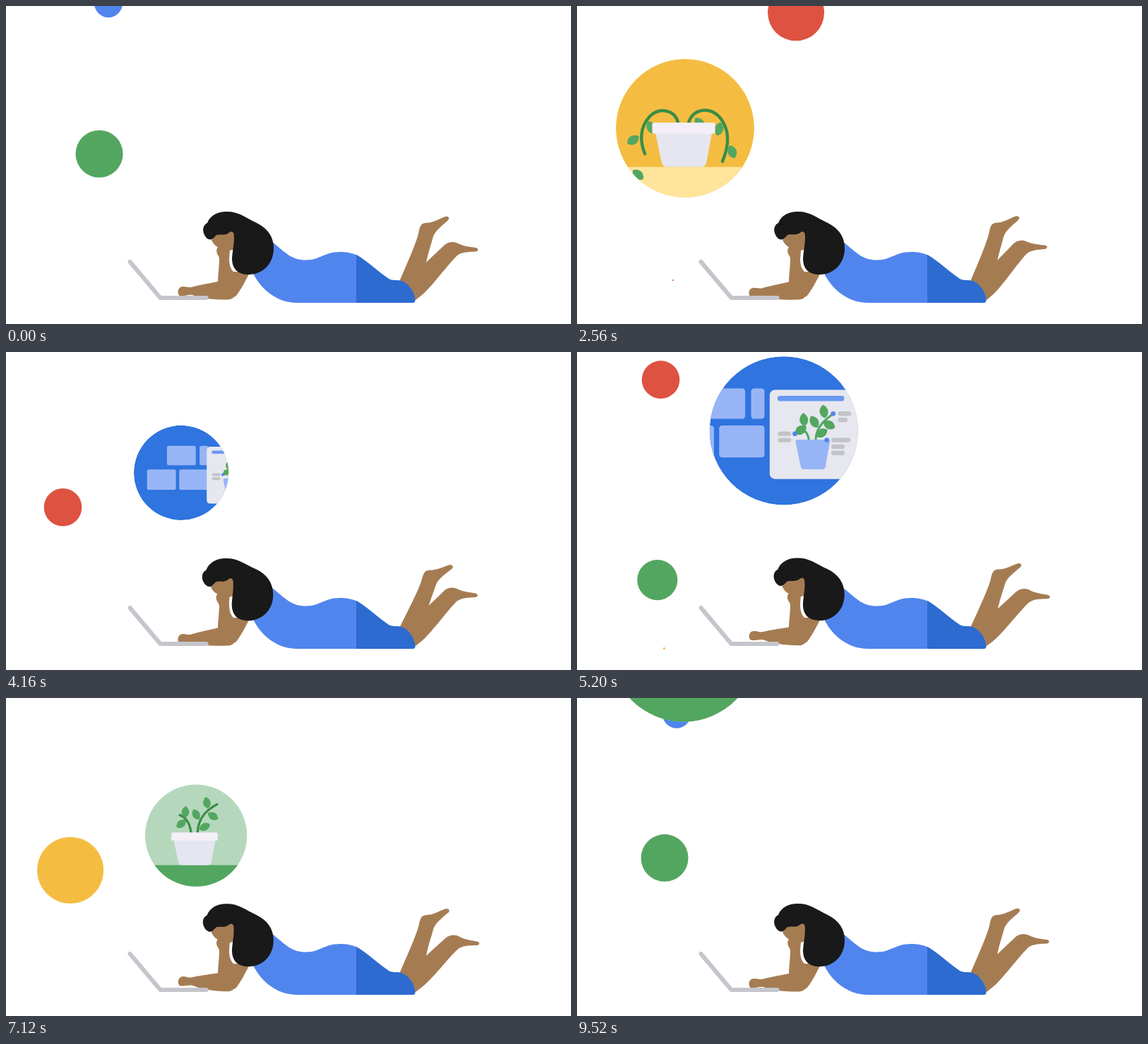
Write an HTML page without scripts that moves like this. It is 800 by 450 pixels and loops after 9.6 s.

```html
<!DOCTYPE html>
<html lang="en">
<head>
<meta charset="utf-8">
<title>Daydreaming at the laptop</title>
<style>
html, body { margin: 0; width: 100%; height: 100%; overflow: hidden; background: #fff; }
svg { display: block; width: 100vw; height: 100vh; }

.move { animation: 9600ms linear infinite; }
.body { animation: 9600ms ease-in-out infinite; }

.red { fill: #de5241; }
.blue { fill: #5185ee; }
.green { fill: #53a660; }
.yellow { fill: #f4bd42; }
.skin { fill: #a57c52; }
.leaf { fill: #53a660; }
.stem { fill: none; stroke: #3a8d46; stroke-width: 4.5; stroke-linecap: round; }
.grey { fill: #c3c4c8; }
.tile { fill: #97b5f6; }

/* plain bubbles, radius 100 scaled down */
#redBig { animation-name: redBig; }
@keyframes redBig {
  0%, 2% { translate: 150px 380px; scale: 0; }
  8% { translate: 172px 300px; scale: .24; }
  15% { translate: 215px 212px; scale: .4; }
  21% { translate: 264px 106px; scale: .4; }
  26.67% { translate: 310px 9.5px; scale: .4; }
  30%, 100% { translate: 333px -55px; scale: .4; }
}
#blueFirst { animation-name: blueFirst; }
@keyframes blueFirst {
  0%, 14.2% { translate: 118px 360px; scale: 0; }
  15% { translate: 115px 355px; scale: .04; }
  20% { translate: 108px 300px; scale: .14; }
  26.67% { translate: 125px 225px; scale: .2; }
  31.5% { translate: 150px 130px; scale: .2; }
  37.5%, 100% { translate: 150px -30px; scale: .2; }
}
#redSmall { animation-name: redSmall; }
@keyframes redSmall {
  0%, 26.2% { translate: 137px 390px; scale: 0; }
  26.67% { translate: 136px 388px; scale: .01; }
  32% { translate: 108px 336px; scale: .11; }
  38% { translate: 87px 277px; scale: .22; }
  43.33% { translate: 80.5px 220px; scale: .268; }
  48% { translate: 92px 150px; scale: .268; }
  53% { translate: 115px 62px; scale: .268; }
  58%, 100% { translate: 130px -35px; scale: .268; }
}
#greenBig { animation-name: greenBig; }
@keyframes greenBig {
  0%, 48% { translate: 136px 388px; scale: 0; }
  54% { translate: 114px 325px; scale: .28; }
  59.4% { translate: 108px 252px; scale: .45; }
  63.33% { translate: 125px 188px; scale: .47; }
  67.7% { translate: 150px 90px; scale: .47; }
  72.5%, 100% { translate: 165px -52px; scale: .47; }
}
#yellowBall { animation-name: yellowBall; }
@keyframes yellowBall {
  0%, 53.6% { translate: 125px 420px; scale: 0; }
  59% { translate: 110px 416px; scale: .14; }
  63.33% { translate: 99px 409.5px; scale: .217; }
  65.8% { translate: 85px 396px; scale: .29; }
  69.5% { translate: 61px 340px; scale: .43; }
  72% { translate: 72px 282px; scale: .47; }
  76.67% { translate: 113px 200px; scale: .47; }
  81.7% { translate: 153px 110px; scale: .47; }
  86.67% { translate: 192px 25px; scale: .47; }
  91%, 100% { translate: 225px -55px; scale: .47; }
}
#blueLast { animation-name: blueLast; }
@keyframes blueLast {
  0% { translate: 145px -3.5px; scale: .2; }
  1% { translate: 149px -32px; scale: .2; }
  1.1%, 75.5% { translate: 140px 388px; scale: 0; }
  81% { translate: 150px 334px; scale: .12; }
  86.67% { translate: 159px 268px; scale: .202; }
  92% { translate: 140px 170px; scale: .202; }
  96% { translate: 131px 93px; scale: .202; }
  99.17% { translate: 141px 23px; scale: .2; }
  100% { translate: 145px -3.5px; scale: .2; }
}
#greenLast { animation-name: greenLast; }
@keyframes greenLast {
  0% { translate: 132px 209.5px; scale: .335; }
  5% { translate: 164px 104px; scale: .335; }
  11% { translate: 178px -38px; scale: .335; }
  11.1%, 85.5% { translate: 124px 372px; scale: 0; }
  86.67% { translate: 115px 356px; scale: .05; }
  91.5% { translate: 101px 306px; scale: .2; }
  96% { translate: 105px 262px; scale: .31; }
  99.17% { translate: 124px 226.5px; scale: .335; }
  100% { translate: 132px 209.5px; scale: .335; }
}

/* thought bubbles */
#wilting { animation-name: wilting; }
@keyframes wilting {
  0%, 1.5% { translate: 215px 318px; scale: 0; }
  8.3% { translate: 178px 245px; scale: .42; }
  15% { translate: 155px 194px; scale: .75; }
  21.67% { translate: 153px 180px; scale: .91; }
  26.67% { translate: 153px 173px; scale: .98; }
  31.2% { translate: 160px 130px; scale: 1.02; }
  35.4% { translate: 185px 20px; scale: 1.02; }
  38.5%, 100% { translate: 200px -110px; scale: 1.02; }
}
#search { animation-name: search; }
@keyframes search {
  0%, 31% { translate: 215px 318px; scale: 0; }
  37% { translate: 231px 238px; scale: .34; }
  43.33% { translate: 248px 171px; scale: .67; }
  52% { translate: 285px 122px; scale: 1.02; }
  59% { translate: 310px 88px; scale: 1.12; }
  63.33% { translate: 320px 61px; scale: 1.13; }
  66.7% { translate: 332px 5px; scale: 1.13; }
  70%, 100% { translate: 348px -120px; scale: 1.13; }
}
#watering { animation-name: watering; }
@keyframes watering {
  0%, 61% { translate: 222px 305px; scale: 0; }
  63.33% { translate: 233.5px 286px; scale: .168; }
  70% { translate: 262px 225px; scale: .55; }
  77% { translate: 274px 174px; scale: .84; }
  86.67% { translate: 267.5px 145.5px; scale: .94; }
  93% { translate: 222px 102px; scale: 1.03; }
  97.5% { translate: 170px 5px; scale: 1.04; }
  99.17% { translate: 151px -70px; scale: 1.04; }
  100% { translate: 140px -112px; scale: 1.04; }
}

#stemLeft { animation-name: stemLeft; }
@keyframes stemLeft {
  0%, 15% { d: path("M-10,-8 C-12,-30 -36,-36 -50,-22 C-63,-9 -66,10 -65,28"); }
  26.67%, 100% { d: path("M-10,-8 C-15,-27 -37,-31 -51,-17 C-65,-2 -66,18 -58,37"); }
}
#stemRight { animation-name: stemRight; }
@keyframes stemRight {
  0%, 15% { d: path("M4,-8 C10,-30 36,-38 51,-23 C66,-8 66,15 63,37"); }
  26.67%, 100% { d: path("M5,-8 C12,-29 35,-31 49,-17 C64,0 65,22 54,48"); }
}
.sag { animation-name: sag; }
@keyframes sag { 0%, 15% { translate: 0 0; } 26.67%, 100% { translate: 0 10px; } }
.fall { animation-name: fall; }
@keyframes fall { 0%, 16% { translate: 0 0; } 24%, 100% { translate: -6px 130px; } }
.fallLate { animation-name: fallLate; }
@keyframes fallLate {
  0%, 21% { translate: 0 0; }
  26.67% { translate: -9px 44px; }
  30%, 100% { translate: -9px 110px; }
}
#tiles { animation-name: tiles; }
@keyframes tiles { 0%, 43.33% { translate: 0 0; } 52%, 100% { translate: -83px 0; } }
#panel { animation-name: panel; }
@keyframes panel { 0%, 39% { translate: 105px 0; } 43.33% { translate: 54px 0; } 52%, 100% { translate: -19px 0; } }
#spout { animation-name: spout; }
@keyframes spout { 0%, 77% { translate: 50px 0; } 81%, 92% { translate: 0 0; } 95%, 100% { translate: 50px 0; } }
#water { animation-name: water; }
@keyframes water { 0%, 81% { opacity: 0; } 83%, 91% { opacity: .42; } 92%, 100% { opacity: 0; } }

/* small body movements */
#legBack { transform-origin: 568px 400px; animation-name: legBack; }
@keyframes legBack {
  0%, 100% { rotate: 0deg; }
  15% { rotate: -2.1deg; }
  26.67% { rotate: -.5deg; }
  43.33% { rotate: 3.3deg; }
  63.33% { rotate: -.4deg; }
  86.67% { rotate: 1.2deg; }
}
#legFront { transform-origin: 578px 412px; animation-name: legFront; }
@keyframes legFront {
  0%, 100% { rotate: 0deg; }
  6% { rotate: 1.5deg; }
  15% { rotate: .7deg; }
  27.5%, 31% { rotate: -2.3deg; }
  43.33% { rotate: -.4deg; }
  49% { rotate: 2.4deg; }
  63.33% { rotate: -2.4deg; }
  72% { rotate: 1.6deg; }
  86.67% { rotate: .7deg; }
  93% { rotate: 1.5deg; }
}
#head { transform-origin: 350px 370px; animation-name: head; }
@keyframes head {
  0%, 100% { rotate: 0deg; }
  15% { rotate: .5deg; }
  26.67% { rotate: .1deg; }
  43.33% { rotate: -1.5deg; }
  63.33% { rotate: 0deg; }
  86.67% { rotate: -.9deg; }
}
#forearm { transform-origin: 318px 408px; animation-name: forearm; }
@keyframes forearm {
  0%, 99%, 100% { rotate: 0deg; }
  7%, 21% { rotate: 2.6deg; }
  15% { rotate: 1.6deg; }
  26.67% { rotate: -1.5deg; }
  35% { rotate: 2deg; }
  43.33% { rotate: -1.8deg; }
  53% { rotate: 2deg; }
  63.33% { rotate: -1deg; }
  75% { rotate: 2.5deg; }
  86.67% { rotate: 4deg; }
}
</style>
</head>
<body>
<svg viewBox="0 0 800 450">
  <defs>
    <clipPath id="round"><circle r="100"/></clipPath>
    <path id="leaf" d="M0,10 C-9,5 -8,-5 0,-10 C8,-5 9,5 0,10Z"/>
    <g id="pot">
      <path fill="#e5e6ef" d="M-43,6 L-34,49 Q-32,56 -26,56 H23 Q30,56 31,49 L39,6Z"/>
      <rect fill="#f4eef7" x="-47.5" y="-8" width="91" height="16" rx="3"/>
    </g>
  </defs>

  <circle id="redBig" class="move red" r="100"/>
  <circle id="blueFirst" class="move blue" r="100"/>
  <circle id="redSmall" class="move red" r="100"/>
  <circle id="greenBig" class="move green" r="100"/>
  <circle id="yellowBall" class="move yellow" r="100"/>
  <circle id="blueLast" class="move blue" r="100"/>
  <circle id="greenLast" class="move green" r="100"/>

  <g id="wilting" class="move">
    <g clip-path="url(#round)">
      <circle class="yellow" r="100"/>
      <rect fill="#fee59b" x="-100" y="56" width="200" height="50"/>
      <path id="stemLeft" class="move stem" d="M-10,-8 C-12,-30 -36,-36 -50,-22 C-63,-9 -66,10 -65,28"/>
      <path id="stemRight" class="move stem" d="M4,-8 C10,-30 36,-38 51,-23 C66,-8 66,15 63,37"/>
      <g class="move sag leaf">
        <use href="#leaf" transform="translate(-75,7) rotate(58)"/>
        <use href="#leaf" transform="translate(-49,-11) rotate(-25)"/>
        <use href="#leaf" transform="translate(21,-17) rotate(-38)"/>
        <use href="#leaf" transform="translate(49,-9) rotate(15)"/>
        <use href="#leaf" transform="translate(68,24) rotate(-20)"/>
      </g>
      <g class="move fall leaf">
        <use href="#leaf" transform="translate(-55,3) rotate(20)"/>
        <use href="#leaf" transform="translate(70,1) rotate(-55)"/>
      </g>
      <g class="move fallLate leaf"><use href="#leaf" transform="translate(-59,23) rotate(-48)"/></g>
      <use href="#pot"/>
    </g>
  </g>

  <g id="search" class="move">
    <g clip-path="url(#round)">
      <circle fill="#2f74df" r="100"/>
      <g id="tiles" class="move tile">
        <rect x="-30" y="-57" width="61" height="41" rx="4"/>
        <rect x="39" y="-57" width="18" height="41" rx="4"/>
        <rect x="-72" y="-7" width="61" height="43" rx="4"/>
        <rect x="-4" y="-7" width="61" height="43" rx="4"/>
      </g>
      <g id="panel" class="move">
        <rect fill="#e6e7ef" y="-55" width="145" height="120" rx="7"/>
        <rect fill="#6a98f1" x="10.5" y="-47" width="90" height="7" rx="3.5"/>
        <g class="grey">
          <rect x="11" y="1" width="18" height="6" rx="3"/>
          <rect x="11" y="9.5" width="18" height="6" rx="3"/>
          <rect x="92" y="-26" width="18" height="6" rx="3"/>
          <rect x="92" y="-17.5" width="13" height="6" rx="3"/>
          <rect x="83" y="9.5" width="26" height="6" rx="3"/>
          <rect x="83" y="18.5" width="18" height="6" rx="3"/>
          <rect x="83" y="27" width="18" height="6" rx="3"/>
        </g>
        <path class="stem" style="stroke:#53a660;stroke-width:3" d="M53,13 Q51,-2 38,-4 M62,13 C62,-6 76,-16 86,-23"/>
        <g class="leaf">
          <use href="#leaf" transform="translate(46,-15) rotate(-5) scale(.9)"/>
          <use href="#leaf" transform="translate(42,-1) rotate(55) scale(.9)"/>
          <use href="#leaf" transform="translate(60,-12) rotate(-30) scale(.9)"/>
          <use href="#leaf" transform="translate(73,-26) rotate(-8) scale(.9)"/>
          <use href="#leaf" transform="translate(80,-8) rotate(-62) scale(.9)"/>
          <use href="#leaf" transform="translate(70,3) rotate(60) scale(.9)"/>
        </g>
        <path class="tile" d="M37,12 H79 Q81,12 81,15 L75,49 Q74,52 72,52 H45 Q43,52 42,49 L35,15 Q35,12 37,12Z"/>
        <g class="blue">
          <circle cx="34" cy="4" r="3.2"/>
          <circle cx="85.5" cy="-23" r="3.2"/>
          <circle cx="77" cy="12.5" r="3.2"/>
        </g>
      </g>
    </g>
  </g>

  <g id="watering" class="move">
    <g clip-path="url(#round)">
      <circle fill="#b5d8bc" r="100"/>
      <rect class="green" x="-100" y="58" width="200" height="50"/>
      <path class="stem" d="M-10,-6 Q-13,-33 -32,-40 M3,-6 C4,-36 22,-51 41,-61"/>
      <g class="leaf">
        <use href="#leaf" transform="translate(-21,-46) rotate(5) scale(1.15)"/>
        <use href="#leaf" transform="translate(-29,-23) rotate(52) scale(1.15)"/>
        <use href="#leaf" transform="translate(21,-64) rotate(-10) scale(1.15)"/>
        <use href="#leaf" transform="translate(0,-41) rotate(-28) scale(1.15)"/>
        <use href="#leaf" transform="translate(33,-38) rotate(-58) scale(1.15)"/>
        <use href="#leaf" transform="translate(17,-17) rotate(62) scale(1.15)"/>
      </g>
      <path id="water" class="move" fill="#fff" d="M68,-56 C20,-64 -15,-45 -30,-6 H17 C22,-25 40,-34 66,-29Z"/>
      <path id="spout" class="move" fill="#358044" d="M65,-26 L70,-55 Q74,-57 77,-53 L83,-45 H150 V-20 L97,-29 L83,-33 L75,-26 Q69,-24 65,-26Z"/>
      <use href="#pot" y="2" x="-1"/>
    </g>
  </g>

  <g class="skin">
    <path id="legBack" class="body" d="M557,390 C565,371 580,338 584,322 C586,312 587,308 594,307 C605,307 613,301 622,298 C627,297 629,301 625,304 C617,311 608,318 605,326 C602,337 597,352 595,364 L580,415 L560,408Z"/>
    <path id="legFront" class="body" d="M570,392 L595,363 C605,353 614,345 621,338 C627,333 635,333 640,336 C648,340 658,341 665,342 C670,343 669,347 665,347.5 C655,348 646,348 639,353 C630,361 608,390 598,400 C592,407 585,412 580,416 L565,410Z"/>
  </g>
  <path class="blue" d="M346,370 C358,400 383,420 412,420 H498 V353 C489,349 481,348 473,348 C450,348 445,359.5 425,359.5 C404,359.5 397,350 376,333Z"/>
  <path fill="#2d6bd0" d="M496,352 C511,360 525,375 542,386 C548,389 553,387.5 558,388.5 C570,391 579,405 579.5,417 Q579,420 576,420 H496Z"/>
  <g class="skin">
    <path d="M302,355 C302,370 300,380 300,392 V410 L325,411 C334,400 338,390 346,376 L322,376 C316,370 316,361 316,354Z"/>
    <path id="forearm" class="body" d="M302,389.5 C285,393 272,395 262,398 C255,398.5 251,395.5 247,398 C242,401 243,408 246,410 C252,411.5 258,408 264,409 C278,414 292,415.5 314,415.5 C324,415.5 329,405 330,395Z"/>
  </g>
  <g id="head" class="body">
    <path class="skin" d="M293,324 L291,331 C293,336 297,340 300,341 C297,345 298,350 301,354 L304,362 L316,358 L317,346 L324,344 V318 H300Z"/>
    <path fill="#191919" d="M281,324 C277,316 280,309 285,307 C289,296 301,290.5 313,291 C330,291 338,299 355,307 C371,315 379,327 379,343 C379,365 363,380 344,380 C328,380 320,372 320,357 C321,343 324,333 322.5,322 Q321,318 317,320 C310,326 304,322 298,324 C295,327 293,330 289,330.5 Q284,330 281,324Z"/>
  </g>
  <path fill="none" stroke="#c5c6cc" stroke-width="6" stroke-linecap="round" stroke-linejoin="round" d="M175.5,362 L218.5,413 H283.5"/>
</svg>
</body>
</html>
```
